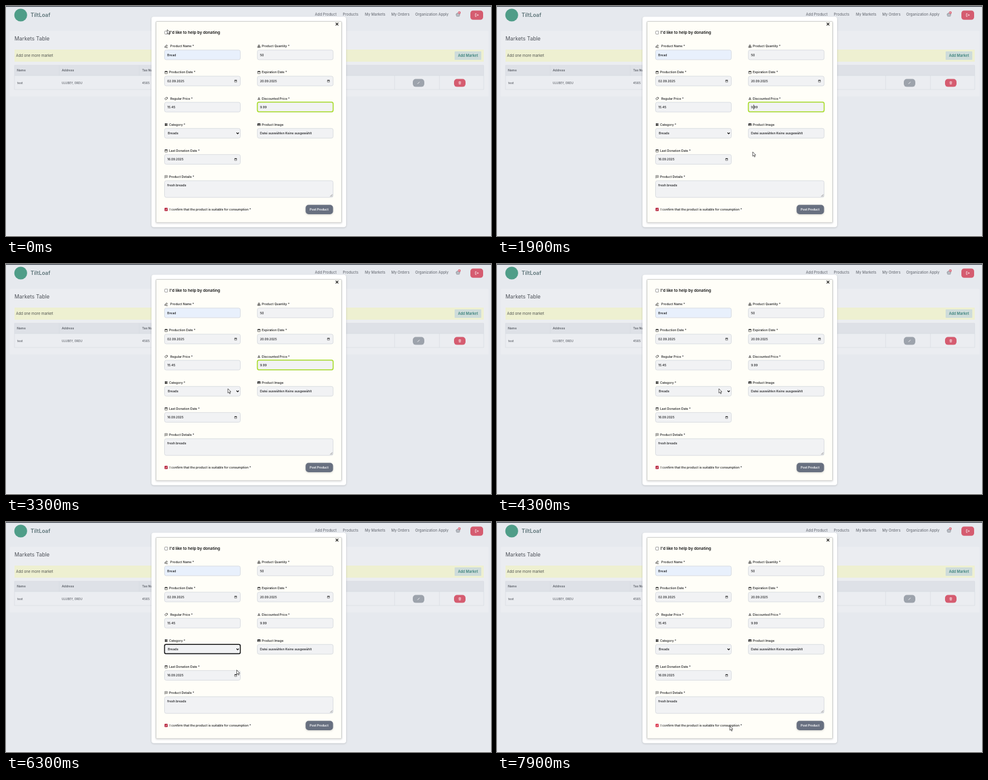
Recreate the animation shown at these times as an HTML page. Size 800 px wide and 380 px high, loop 8 s.

```html
<!DOCTYPE html>
<html lang="en">
<head>
<meta charset="utf-8">
<title>Product form</title>
<style>
html, body { margin: 0; width: 100%; height: 100%; overflow: hidden; background: #e6e9ee; }
svg { display: block; width: 800px; height: 380px; }
text { font-family: Inter, "Open Sans", sans-serif; font-weight: 500; white-space: pre; }
</style>
</head>
<body>
<svg id="stage" viewBox="0 0 800 380"></svg>
<script>
const stage = document.getElementById('stage');
const rect = (x, y, w, h, fill, r = 0, more = '') =>
  `<rect x="${x}" y="${y}" width="${w}" height="${h}" rx="${r}" fill="${fill}" ${more}/>`;
// y is the middle of the capital letters
const text = (x, y, s, size = 5.15, fill = '#17181b', weight = 500) =>
  `<text x="${x}" y="${y + size * .364}" font-size="${size}" fill="${fill}" style="font-weight:${weight}">${s}</text>`;
const path = (d, stroke = '#222', width = .7, fill = 'none', more = '') =>
  `<path d="${d}" stroke="${stroke}" stroke-width="${width}" fill="${fill}" ${more}/>`;
const at = (x, y, s) => `<g transform="translate(${x} ${y})">${s}</g>`;

// Icons, centred on 0,0
const icons = {
  pen: path('M-2.2 1.8L-1.6 0L1 -2.2L2.2 -1L-.4 1.4ZM0 2.3H2.6', '#222', .8),
  boxes: path('M-1 -2.1H1V-.2H-1ZM-2.2 .2H-.2V2.1H-2.2ZM.2 .2H2.2V2.1H.2Z', '#222', .6),
  date: path('M-2 -1.6H2V2.1H-2ZM-1.1 -2.4V-1.6M1.1 -2.4V-1.6', '#222', .6) + rect(-2, -1.7, 4, 1.2, '#222'),
  tag: path('M-2.3 .6L.1 -1.9L2.2 -1.6L2.3 .2L-.4 2.2Z', '#222', .7) + '<circle cx="1.1" cy="-.7" r=".4"/>',
  scale: path('M-2.3 1.8H2.3M-1.8 .6H1.8M0 -2V.5M-1.2 -.8H1.2', '#444', .7),
  grid: [[-2.1, -2.1], [.2, -2.1], [-2.1, .2], [.2, .2]].map(([x, y]) => rect(x, y, 1.9, 1.9, '#222')).join(''),
  image: rect(-2.5, -2, 5, 4, '#222', .5) + path('M-1.9 1.4L-.6 -.1L.2 .6L1 -.4L2 1.4Z', 'none', 0, '#fff'),
  note: path('M-2.2 -1.9H2.2V1.3H-.6L-2.2 2.3ZM-1.2 -.8H1.2M-1.2 .3H.6', '#333', .55)
};

const nav = '#71757d', cell = '#5c6068', rule = '#d5d9df';
const page =
  rect(0, 0, 800, 380, '#e6e9ee') + rect(0, 0, 800, 1.2, '#343943') + rect(0, 379, 800, 1, '#f3f5f7') +
  '<circle cx="24.3" cy="15" r="10.6" fill="#4f9d88"/>' +
  text(40.5, 15, 'TiltLoaf', 8.8, '#5d7478', 600) +
  [[509.5, 'Add Product'], [555.5, 'Products'], [592, 'My Markets'], [635.5, 'My Orders'], [675, 'Organization Apply']]
    .map(([x, s]) => text(x, 13.8, s, 6, nav)).join('') +
  at(745.5, 14, path('M-3 -.8H3L2.2 2.8H-2.2ZM-1.8 -1L-.6 -3M1.8 -1L.6 -3M-.8 .5V1.8M.8 .5V1.8', '#70757e', .8)) +
  '<circle cx="747.8" cy="11" r="2.3" fill="#dc7180"/>' + rect(747.5, 10, .6, 2, '#fff') +
  rect(766, 7.5, 21, 15.2, '#d55c70', 4.5) +
  at(776.5, 15, path('M-.4 -2.3H-2.3V2.3H-.4M-.8 0H2.7M1.3 -1.4L2.7 0L1.3 1.4', '#fff', .7)) +
  rect(6, 41, 790, 108.5, '#ebedf1', 2) +
  text(14, 54, 'Markets Table', 8.7, '#4f535a', 400) +
  rect(14, 72, 774, 20, '#eef0d1') + text(16.5, 81.8, 'Add one more market', 6, '#50534f', 400) +
  rect(740, 75, 44, 14, '#cedcda', 1) + text(745.5, 81.9, 'Add Market', 5.9, '#3e837d', 600) +
  rect(14, 97.8, 774, 17.2, '#dee1e7') +
  path('M14 98V138H788V98M14 97.8H788M14 115H788M88 98V115M220 98V115M641 115V138M715 115V138', rule, .6) +
  text(18, 106.5, 'Name', 5.1, cell, 600) + text(92, 106.5, 'Address', 5, cell, 600) +
  text(224.5, 106.5, 'Tax Number', 5.1, cell, 600) +
  text(18.5, 127, 'test', 5.1, cell) + text(92, 127, 'ULUBEY, ORDU', 4.6, cell) + text(224.5, 127, '4565', 5, cell) +
  rect(671, 120.6, 19, 13, '#9da3ac', 5) + at(680.5, 127, path('M-1.7 1.7L1.6 -1.6', '#f4f5f7', 1)) +
  rect(739, 120.6, 19, 13, '#d55c70', 5) +
  at(748.5, 127, path('M-2 -1.5H2M-.7 -2.2H.7M-1.4 -1.3L-1.2 2.1H1.2L1.4 -1.3M0 -.6V1.4', '#fff', .6));

const left = 261.5, right = 414.6, rowY = i => 66.4 + i * 43.15;
const field = (x, y, w = 125, h = 16, fill = '#f1f2f4') =>
  rect(x, y, w, h, fill, 2.8, 'stroke="#d2d6dc" stroke-width=".8"');
// Label, box and value of one form entry
const entry = (col, row, icon, label, value, kind) => {
  const x = col ? right : left, y = rowY(row), tx = x + (col ? 4.4 : 4.6);
  let s = at(x + 2.6, y + .1, icons[icon]) + text(x + (/date|grid|image|scale|note/.test(icon) || col ? 7.4 : 9.6), y, label);
  s += field(x, y + 6.4, 125, 16, kind === 'filled' ? '#e8f0fc' : undefined);
  s += text(kind === 'select' ? tx + 1 : tx, y + 14.3, value, kind === 'date' ? 5 : 5.15);
  if (kind === 'date') s += at(x + 117.3, y + 14.4, `<g transform="scale(.85)">${icons.date}</g>`);
  if (kind === 'select') s += at(x + 120.6, y + 14.3, path('M-1.9 -.9L0 1L1.9 -.9', '#111', 1.1));
  return s;
};

const modal =
  rect(240, 17.8, 321, 347.4, '#fff', 4, 'filter="url(#soft)"') +
  rect(247.5, 25.5, 306, 332.3, '#fffef8', 1, 'filter="url(#soft)" stroke="#c2c3c2" stroke-width=".8"') +
  path('M543.8 27.7L548.2 32.1M548.2 27.7L543.8 32.1', '#111', 1.1) +
  rect(261.7, 41.4, 5, 5, '#fff', .8, 'stroke="#777" stroke-width=".7"') +
  text(269.8, 44, "I'd like to help by donating", 6.6, '#111', 600) +
  entry(0, 0, 'pen', 'Product Name *', 'Bread', 'filled') + entry(1, 0, 'boxes', 'Product Quantity *', '50') +
  entry(0, 1, 'date', 'Production Date *', '02.09.2025', 'date') + entry(1, 1, 'date', 'Expiration Date *', '20.09.2025', 'date') +
  entry(0, 2, 'tag', 'Regular Price *', '15.45') + entry(1, 2, 'scale', 'Discounted Price *', '9.99') +
  entry(0, 3, 'grid', 'Category *', 'Breads', 'select') +
  entry(1, 3, 'image', 'Product Image', 'Datei auswählen Keine ausgewählt') +
  entry(0, 4, 'date', 'Last Donation Date *', '16.09.2025', 'date') +
  at(left + 2.6, 282, icons.note) + text(left + 7.4, 282, 'Product Details *') +
  field(left, 288.7, 278, 27.5) + text(266.1, 296.5, 'fresh breads') +
  path('M534.6 315L538.4 311.2M536.8 315L538.4 313.4', '#555', .6) +
  rect(261.5, 333.6, 5.2, 5.2, '#b51f38', .8, 'id="check"') +
  path('M262.8 336.3L263.8 337.3L265.6 335', '#fff', .8) +
  text(269.8, 336.2, 'I confirm that the product is suitable for consumption *') +
  rect(494.2, 328.6, 45.3, 15.4, '#687080', 5, 'filter="url(#soft)"') +
  text(501, 336.2, 'Post Product', 5, '#fff', 600);

stage.innerHTML =
  `<defs><filter id="soft" x="-10%" y="-10%" width="120%" height="130%">
    <feDropShadow dx="0" dy="1" stdDeviation="1.6" flood-opacity=".18"/></filter></defs>` +
  page + modal +
  rect(right, 158.7, 125, 16, 'none', 2.8, 'id="price" stroke="#a9dd2b" stroke-width="1.6"') +
  rect(left, 202.2, 125, 15.4, 'none', 2.4, 'id="select" stroke="#111" stroke-width="1.5"') +
  rect(423, 163, .8, 8, '#222', 0, 'id="beam"') +
  `<g id="cursor">${path('M0 0V7.2L1.7 5.7L2.9 8.4L4.1 7.8L2.9 5.2H5Z', '#222', .7, '#fff', 'stroke-linejoin="round"')}</g>`;

// time, x, y of the pointer
const track = [
  [0, 266, 39], [200, 275, 41], [800, 423.8, 56], [1100, 424, 90], [1400, 423, 165], [1700, 422, 270],
  [1900, 421.8, 241], [2300, 415, 232], [2700, 370, 211], [2900, 366, 206], [5100, 366, 206],
  [5500, 376, 219], [5800, 379, 222], [6200, 379, 222], [6500, 385, 309], [6800, 385, 309],
  [6900, 404, 317], [7200, 404, 317], [7300, 391.5, 323], [7600, 385, 335], [7900, 384, 337]
];
const part = id => document.getElementById(id);
const show = (id, on) => part(id).setAttribute('visibility', on ? 'visible' : 'hidden');

function pointer(t) {
  const i = track.findIndex(p => p[0] > t);
  if (i < 0) return track[track.length - 1].slice(1);
  const [t0, x0, y0] = track[i - 1], [t1, x1, y1] = track[i];
  const u = (t - t0) / (t1 - t0), k = u * u * (3 - 2 * u);
  return [x0 + (x1 - x0) * k, y0 + (y1 - y0) * k];
}

function draw(now) {
  const t = Math.floor(now % 8000 / 100) * 100;
  part('cursor').setAttribute('transform', `translate(${pointer(t)})`);
  show('price', t < 3500);
  show('select', t >= 5100 && t < 7700);
  show('beam', t >= 1500 && t < 2100);
  part('check').setAttribute('fill', t >= 7700 ? '#d92f47' : '#b51f38');
  requestAnimationFrame(() => draw(performance.now() - start));
}
const start = performance.now();
draw(0);
</script>
</body>
</html>
```
